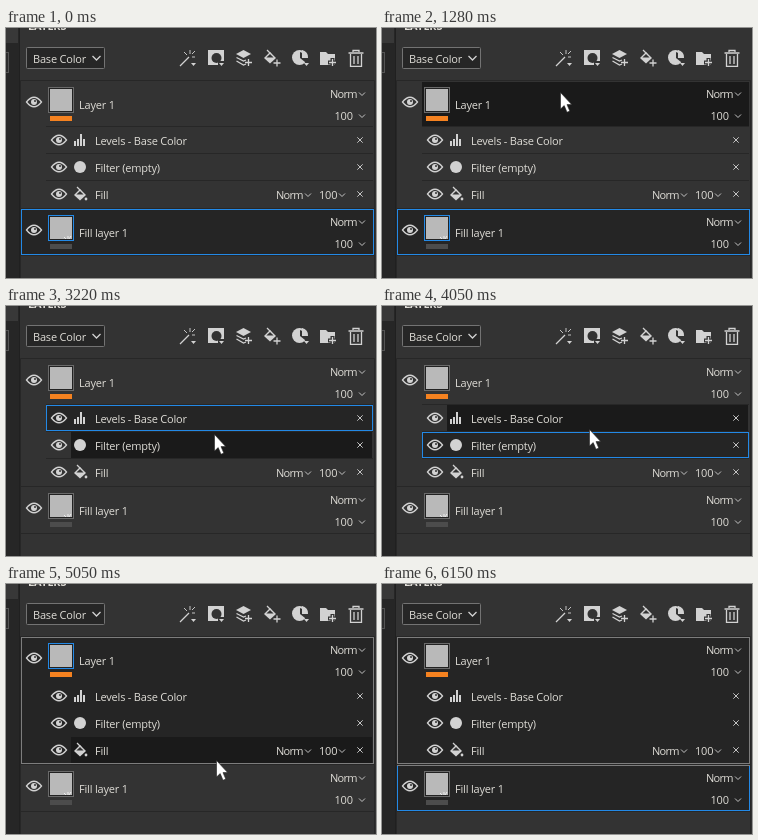
An HTML page for the animation above (6.52 s loop, 370 by 250 pixels).

```html
<!DOCTYPE html>
<html lang="en">
<head>
<meta charset="utf-8">
<title>Layer stack</title>
<style>
  html, body { margin: 0; width: 100%; height: 100%; overflow: hidden; background: #333; }
  svg { display: block; width: 370px; height: 250px; }
  text { font: 11px "Open Sans", "Noto Sans", sans-serif; letter-spacing: -.2px; fill: #dedcd6; }
  .tight { letter-spacing: -.7px; }
  .icon { fill: #d2d2d2; }
  .line { fill: none; stroke: #d2d2d2; stroke-width: 1.3; }
  .thin { fill: none; stroke: #c4c4c4; }
  .cut { fill: none; stroke: #333; stroke-width: 1.5; }
  .frame { fill: none; stroke: #7d7d7d; }
  .blue { stroke: #2389e6; }
</style>
</head>
<body>
<svg viewBox="0 0 370 250">
  <defs>
    <g id="eye">
      <path class="line" d="M-7.5 0Q0 -9.5 7.5 0Q0 9.5 -7.5 0Z"/>
      <circle class="icon" r="3"/>
      <circle cx="1" cy="-1" r="1" fill="#333"/>
    </g>
    <path id="chevron" class="thin" d="M-3 -1.5L0 1.5L3 -1.5"/>
    <path id="close" class="thin" d="M-2.7 -2.7L2.7 2.7M2.7 -2.7L-2.7 2.7"/>
    <path id="more" class="icon" d="M0 0H5L2.5 3Z"/>
    <path id="plus" class="line" d="M-3.5 0H3.5M0 -3.5V3.5"/>
    <g id="bucket">
      <path class="icon" d="M-6 1L0 -5L6 1L0 6.5Z"/>
      <path class="line" d="M-3 -7L1 -3"/>
      <path fill="#333" d="M-3.6 .6L0 -3L3.6 .6Z"/>
    </g>
  </defs>

  <rect width="370" height="250" fill="#333"/>
  <rect width="13" height="250" fill="#262626"/>
  <rect width="12" height="15" fill="#383838"/>
  <rect x="13" width="1" height="250" fill="#202020"/>
  <rect x="-5.5" y="24.5" width="8" height="20" fill="#2c2c2c" stroke="#555"/>
  <text x="22" y="2" font-weight="700" style="font-weight:700">LAYERS</text>

  <rect x="20.5" y="19.5" width="78" height="21" rx="1" fill="#262626" stroke="#737373"/>
  <text x="27" y="35">Base Color</text>
  <path class="line" d="M86.5 28L90.5 32L94.5 28"/>

  <path class="line" d="M174 38L183 29"/>
  <path class="thin" d="M184 22V26M189 29H186M178 24L181 27M189 23L186 26"/>
  <use href="#more" x="185" y="35"/>
  <path class="icon" d="M202 22H218V33H212V37H202Z"/>
  <circle cx="210.5" cy="30" r="5" fill="#333"/>
  <use href="#more" x="213" y="35"/>
  <path class="icon" d="M230 26L237.5 22L245 26L237.5 30Z"/>
  <path class="line" d="M230.5 29.5L237.5 33L240 32M230.5 33L237.5 37L240 36"/>
  <use href="#plus" x="242.5" y="34.5"/>
  <use href="#bucket" x="264" y="29"/>
  <use href="#plus" x="271" y="35"/>
  <circle class="icon" cx="293.5" cy="29.5" r="7.5"/>
  <path fill="#333" d="M294 24V30L299 34H303V28Z"/>
  <path class="icon" d="M296 22A7 7 0 0 1 302 30H296Z"/>
  <use href="#more" x="298" y="35"/>
  <path class="icon" d="M314 24H320L322 26H329V37H314Z"/>
  <path d="M322 34.5H331M326.5 30V39" stroke="#333" stroke-width="4"/>
  <use href="#plus" x="326.5" y="34.5"/>
  <path class="line" d="M342.5 25H357.5M347 24V22.5H353V24M344.5 26V38.3H355.5V26M348 28V36M352 28V36"/>

  <path d="M40 98.5H367M40 125.5H367M40 152.5H367M14.5 250V52.500H368.500V250M15 180.5H368M15 227.5H368"
    fill="none" stroke="#272727"/>
  <g fill="#252525">
    <rect id="topFill" x="15" y="53" width="353" height="127"/>
    <rect id="lowFill" x="15" y="181" width="353" height="46"/>
    <rect id="rowFill" x="40" width="327" height="26"/>
  </g>
  <rect id="hover" fill="#1a1a1a"/>

  <g id="content"></g>

  <rect id="topFrame" class="frame" x="15.5" y="53.5" width="352" height="126"/>
  <rect id="lowFrame" class="frame blue" x="15.5" y="181.5" width="352" height="45"/>
  <path id="lowEdge" class="frame" d="M15 181.5H368"/>
  <rect id="rowFrame" class="frame blue" x="40.5" width="326" height="25"/>
  <path id="cursor" d="M.5 .5V17L4.2 13.6L7 20.3L9.8 19.1L7 12.6H11.7Z" fill="#fff" stroke="#222" stroke-width=".6"/>
</svg>
<script>
const $ = id => document.getElementById(id);
const rowTop = i => 99 + 27 * i;
const use = (id, x, y) => `<use href="#${id}" x="${x}" y="${y}"/>`;
const text = (x, y, s, cls = '') => `<text x="${x}" y="${y}" class="${cls}">${s}</text>`;
const blend = (x, y) => text(x, y, 'Norm', 'tight') + use('chevron', x + 32, y - 4);
const opacity = (x, y, arrow) => text(x, y, '100') + use('chevron', arrow, y - 4);

const layer = (y, name, bar, id) => use('eye', 28, y + 20) +
  `<rect x="42.5" y="${y + 5.5}" width="25" height="25" fill="#222" stroke="#6a6a6a"/>
   <rect x="44" y="${y + 7}" width="22" height="22" fill="#b9b9b9"/>
   <rect id="${id}" class="frame blue" x="42.5" y="${y + 5.5}" width="25" height="25"/>
   <rect x="44" y="${y + 34}" width="22" height="5" fill="${bar}"/>` +
  text(73, y + 27, name) + blend(324, y + 16) + opacity(328.5, y + 38, 356);

const effect = (i, name, icon) => {
  const y = rowTop(i) + 13;
  return use('eye', 53, y) + icon(y) + text(89, y + 5, name) + use('close', 354, y);
};
const levels = y => `<path class="icon" d="M68 ${y + 1}h2v5h-2zm3 -2h2v7h-2zm3 -5h2v12h-2zm3 5h2v7h-2z"/>`;
const dot = y => `<circle class="icon" cx="74" cy="${y}" r="6"/>`;
const fill = y => use('bucket', 74, y) + `<circle class="icon" cx="80" cy="${y + 5}" r="1.4"/>`;

$('content').innerHTML =
  layer(54, 'Layer 1', '#f58220', 'topThumb') +
  effect(0, 'Levels - Base Color', levels) +
  effect(1, 'Filter (empty)', dot) +
  effect(2, 'Fill', fill) + blend(270, 171) + opacity(313, 171, 336) +
  layer(182, 'Fill layer 1', '#4c4c4c', 'lowThumb') +
  '<path d="M58 209l2 2M62 208v3M65 208l-2 3" stroke="#eee"/>';

const loop = 6520, step = 90;
const smooth = p => p * p * (3 - 2 * p);
const out = k => p => 1 - (1 - p) ** k;

// The pointer comes in from below, visits the rows and leaves below.
const entry = [178, 254];
const moves = [
  { start: 640, steps: 5, to: [178, 64], ease: out(1.7) },
  { start: 2210, steps: 5, to: [207, 108], ease: smooth },
  { start: 3130, steps: 4, to: [208, 134], ease: out(2) },
  { start: 4050, steps: 4, to: [204, 64], ease: smooth },
  { start: 4870, steps: 5, to: [211, 191], ease: out(2.3) },
  { start: 5880, steps: 4, to: [307, 256], ease: smooth }
];
// Each click: when, and whether a layer, both layers or an effect row is chosen.
const clicks = [[0, 'low'], [1650, 'both'], [2850, 0], [3680, 1], [4690, 'top'], [5510, 'both']];

function pointer(t) {
  let pos = entry;
  for (const { start, steps, to, ease } of moves) {
    if (t < start) break;
    const p = ease(Math.min(1, (Math.floor((t - start) / step) + 1) / steps));
    pos = pos.map((v, i) => Math.round(v + (to[i] - v) * p));
  }
  return pos;
}

function hoverBox(y) {
  if (y < 54 || y >= 227) return null;
  if (y < 98) return { x: 40, y: 54, width: 327, height: 44 };
  if (y >= 181) return { x: 40, y: 182, width: 327, height: 44 };
  const i = Math.max(0, Math.min(2, Math.floor((y - rowTop(0)) / 27)));
  return { x: 65, y: rowTop(i), width: 301, height: 26 };
}

const show = (id, on) => $(id).style.display = on ? '' : 'none';
const set = (id, attrs) => Object.entries(attrs).forEach(([k, v]) => $(id).setAttribute(k, v));

function draw(now) {
  const t = now % loop;
  const sel = clicks.findLast(([time]) => time <= t)[1];
  const both = sel === 'both', top = both || sel === 'top', low = both || sel === 'low';
  const row = typeof sel === 'number';

  show('topFill', top); show('topFrame', top); show('topThumb', sel === 'top');
  show('lowFill', low); show('lowFrame', low); show('lowThumb', sel === 'low');
  show('lowEdge', both);
  show('rowFill', row); show('rowFrame', row);
  if (row) {
    set('rowFill', { y: rowTop(sel) });
    set('rowFrame', { y: rowTop(sel) + .5 });
  }

  const [x, y] = pointer(t);
  const box = hoverBox(y);
  show('hover', box);
  if (box) set('hover', box);
  set('cursor', { transform: `translate(${x} ${y})` });
  requestAnimationFrame(draw);
}
draw(performance.now());
</script>
</body>
</html>
```
